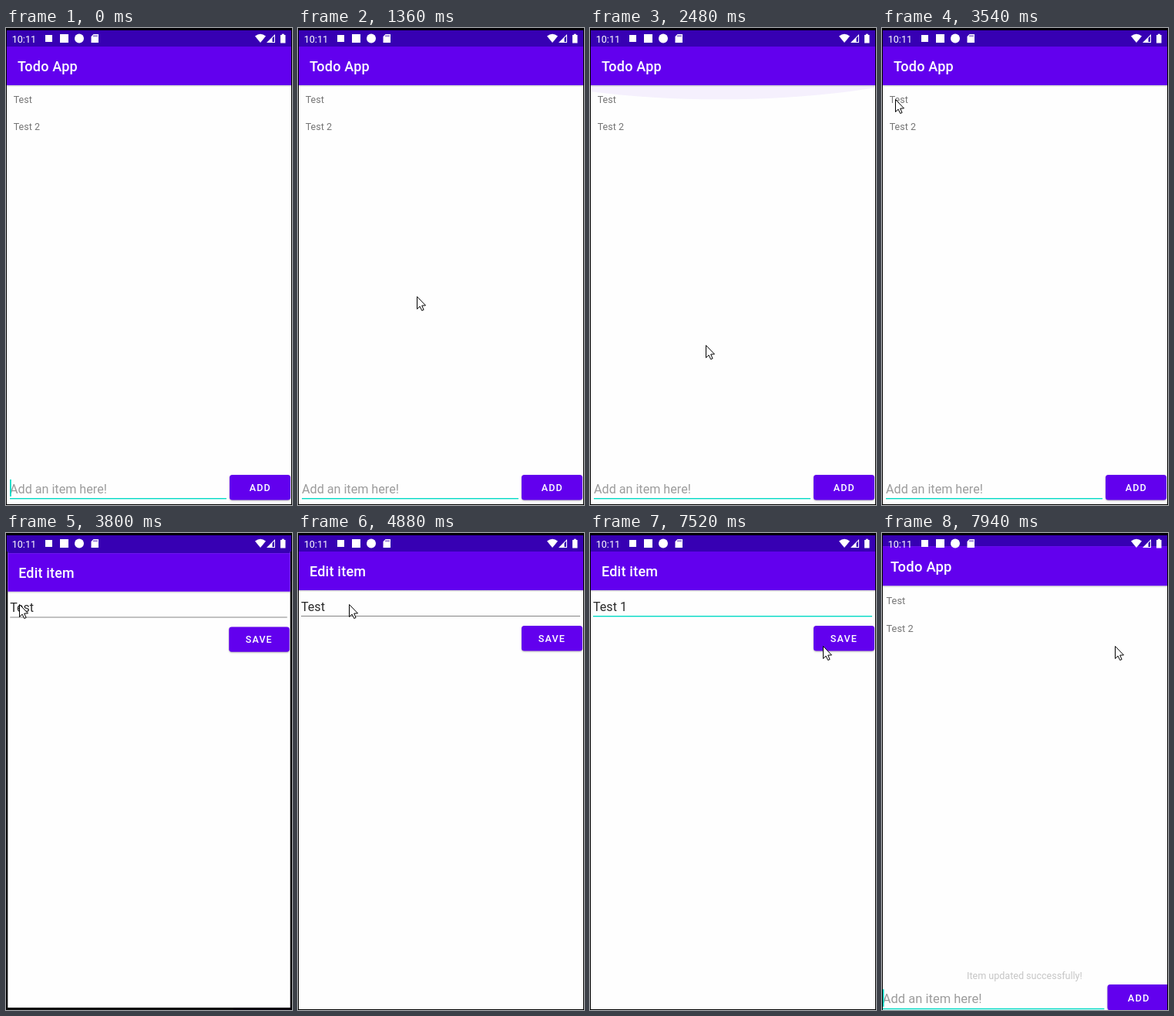
Write an HTML page with a canvas that moves like this. It is 371x617 px and loops after 8000 ms.

```html
<!DOCTYPE html>
<html lang="en">
<head>
<meta charset="utf-8">
<title>Todo App</title>
<style>
  html, body { margin: 0; width: 100%; height: 100%; overflow: hidden; background: #000; }
  canvas { display: block; width: 371px; height: 617px; }
</style>
</head>
<body>
<canvas id="stage"></canvas>
<script>
const W = 371, H = 617, LOOP = 8000;
const PRIMARY = '#6200ee', DARK = '#3700b3', TEAL = '#03dac5', PAGE = '#fefefe';
const OPEN = 3680, FOCUS = 5000, TYPE = 5780, PRESS = 7670, CLOSE = 7940;
const canvas = document.getElementById('stage');
const ctx = canvas.getContext('2d');
const dpr = window.devicePixelRatio || 1;
canvas.width = W * dpr;
canvas.height = H * dpr;

// The pointer rests at each stop and reaches the next one after a short move
const MOVE = 220;
const STOPS = [
  { t: 400, x: 343, y: 363 }, { t: 680, x: 157, y: 244 }, { t: 950, x: 77, y: 119 },
  { t: 1360, x: 154, y: 347 }, { t: 1630, x: 154, y: 213 }, { t: 1900, x: 154, y: 262 },
  { t: 2180, x: 150, y: 433 }, { t: 2480, x: 150, y: 410 }, { t: 2870, x: 17, y: 92 },
  { t: 4880, x: 66, y: 92 }, { t: 5660, x: 178, y: 144 }, { t: 6300, x: 172, y: 239 },
  { t: 6900, x: 302, y: 146 }
];

const clamp = x => Math.min(1, Math.max(0, x));
const easeOut = x => 1 - (1 - clamp(x)) ** 5;
const smooth = x => x * x * (3 - 2 * x);
const blinkOn = (t, start) => (t - start) % 1000 < 500;

// Parabolic rise from start to peak and fall from peak to end
function pulse(t, start, peak, end) {
  const x = (t - peak) / (t < peak ? peak - start : end - peak);
  return Math.max(0, 1 - x * x);
}

function box(x, y, w, h, color) {
  ctx.fillStyle = color;
  ctx.fillRect(x, y, w, h);
}

function text(str, x, y, size, color, weight = 400, spacing = 0) {
  ctx.font = `${weight} ${size}px Roboto, sans-serif`;
  ctx.letterSpacing = spacing + 'px';
  ctx.fillStyle = color;
  ctx.fillText(str, x, y);
  return ctx.measureText(str).width;
}

function polygon(points, color) {
  ctx.beginPath();
  points.forEach(([x, y]) => ctx.lineTo(x, y));
  ctx.closePath();
  ctx.fillStyle = color;
  ctx.fill();
}

function disc(x, y, r, color) {
  ctx.beginPath();
  ctx.arc(x, y, r, 0, 7);
  ctx.fillStyle = color;
  ctx.fill();
}

function zoomed(scale, draw) {
  ctx.save();
  ctx.translate(185.5, 320);
  ctx.scale(scale, scale);
  ctx.translate(-185.5, -320);
  draw();
  ctx.restore();
}

function button(label, x, y, ripple = 0) {
  ctx.save();
  ctx.beginPath();
  ctx.roundRect(290, y, 79, 32.5, 3.5);
  ctx.shadowColor = 'rgba(0,0,0,.3)';
  ctx.shadowBlur = 2 * dpr;
  ctx.shadowOffsetY = dpr;
  ctx.fillStyle = PRIMARY;
  ctx.fill();
  ctx.shadowColor = 'transparent';
  ctx.clip();
  disc(302, 146, ripple, 'rgba(255,255,255,.24)');
  ctx.restore();
  text(label, x, y + 21, 12.56, '#fff', 500, 1.12);
}

function header(title) {
  const shade = ctx.createLinearGradient(0, 74, 0, 76.5);
  shade.addColorStop(0, 'rgba(0,0,0,.2)');
  shade.addColorStop(1, 'rgba(0,0,0,0)');
  box(1, 74, 369, 2.5, shade);
  box(1, 3, 369, 21, DARK);
  box(1, 24, 369, 50, PRIMARY);
  text(title, 15, 56, 18, '#fff', 500, .22);
}

// Overscroll arc growing from the given edge
function glow(size, alpha, edge, direction) {
  const radius = 444, depth = 59.5;
  ctx.save();
  ctx.beginPath();
  ctx.rect(1, 74, 369, 501);
  ctx.clip();
  ctx.translate(168, edge);
  ctx.scale(1, size * direction);
  disc(0, depth - radius, radius, `rgba(98,0,238,${alpha})`);
  ctx.restore();
}

function todoScreen(t) {
  box(1, 3, 369, 613, PAGE);
  glow(.8 * pulse(t, 1740, 2120, 2580), .055, 74, 1);
  glow(.85 * pulse(t, 1490, 1650, 2170), .12, 575, -1);
  header('Todo App');
  text('Test', 9.7, 97.3, 12.56, '#757575');
  text('Test 2', 9.7, 132.3, 12.56, '#757575');
  text('Add an item here!', 5, 601.5, 16.15, '#9c9c9c');
  box(5, 608, 281, 1.4, TEAL);
  if (!blinkOn(t, 60) || t < 60) box(5, 584, 1.8, 22, TEAL);
  button('ADD', 315.7, 578);
}

function editScreen(t) {
  const focused = t >= FOCUS, typing = t >= TYPE;
  const extra = Math.floor(2 * clamp((t - TYPE + 240) / 480));
  box(1, 3, 369, 613, PAGE);
  header('Edit item');
  const width = text('Test 1'.slice(0, 4 + extra), 4, 100.5, 16.1, '#2a2a2a');
  box(4, 107, 362, focused ? 1.4 : 1, focused ? TEAL : '#858585');
  if (focused && blinkOn(t, typing ? TYPE + 170 - 1000 : FOCUS)) box(3 + width, 83, 2, 22, TEAL);
  if (t >= FOCUS + 150 && !typing) {
    disc(35.5, 118, 8.5, TEAL);
    polygon([[35.5, 107.5], [42, 113], [29, 113]], TEAL);
  }
  button('SAVE', 311.7, 120, t < PRESS ? 0 : 38 + (t - PRESS) * .37);
}

function statusBar() {
  const white = '#fff';
  text('10:11', 7.7, 18.5, 12.6, white);
  box(51, 9, 9, 9, white);
  box(70, 8, 11, 11, white);
  disc(95, 13.5, 6, white);
  polygon([[113.5, 8], [120, 8], [120, 19], [110.5, 19], [110.5, 11]], white);
  for (let x = 113.5; x < 118; x += 2) box(x, 9.3, 1, 2, DARK);

  ctx.beginPath();
  ctx.moveTo(330, 19);
  ctx.lineTo(323, 10.5);
  ctx.quadraticCurveTo(330, 5, 337, 10.5);
  ctx.fillStyle = white;
  ctx.fill();

  polygon([[349, 8], [349, 19], [338, 19]], white);
  polygon([[348, 10.5], [348, 18], [345.5, 18], [345.5, 13]], DARK);
  box(356, 9, 6.5, 10.5, white);
  box(357.8, 7.7, 3, 2, white);
}

function pointer(t) {
  if (t < STOPS[0].t) return;
  const next = STOPS.findIndex(stop => stop.t > t);
  const to = STOPS.at(next), from = next > 0 ? STOPS[next - 1] : to;
  const k = smooth(clamp(1 - (to.t - t) / MOVE));
  ctx.save();
  ctx.translate(Math.round(from.x + (to.x - from.x) * k) + .5,
                Math.round(from.y + (to.y - from.y) * k) + .5);
  polygon([[0, 0], [0, 16], [3.6, 12.6], [6.2, 18], [8.6, 17], [6.2, 11.6], [11, 11.4]], '#fff');
  ctx.strokeStyle = '#000';
  ctx.stroke();
  ctx.restore();
}

// The list grows and darkens while the edit page settles over it
function editOverList(t) {
  const progress = easeOut((t - OPEN + 80) / 440);
  zoomed(1 + .05 * progress, () => todoScreen(t));
  box(1, 3, 369, 614, `rgba(0,0,0,${progress})`);
  zoomed(.85 + .15 * progress, () => editScreen(t));
  box(1, 3, 369, 21, DARK);
}

function draw(t) {
  ctx.setTransform(dpr, 0, 0, dpr, 0, 0);
  box(0, 0, W, H, '#000');
  ctx.save();
  ctx.beginPath();
  ctx.rect(1, 3, 369, 614);
  ctx.clip();
  if (t < OPEN) {
    todoScreen(t);
  } else if (t < CLOSE) {
    editOverList(t);
  } else {
    zoomed(1.0235, () => todoScreen(t));
    text('Item updated successfully!', 110, 577.3, 12.56, '#c6c6c6');
  }
  statusBar();
  ctx.restore();
  pointer(t);
}

function tick() {
  draw(performance.now() % LOOP);
  requestAnimationFrame(tick);
}
tick();
</script>
</body>
</html>
```
